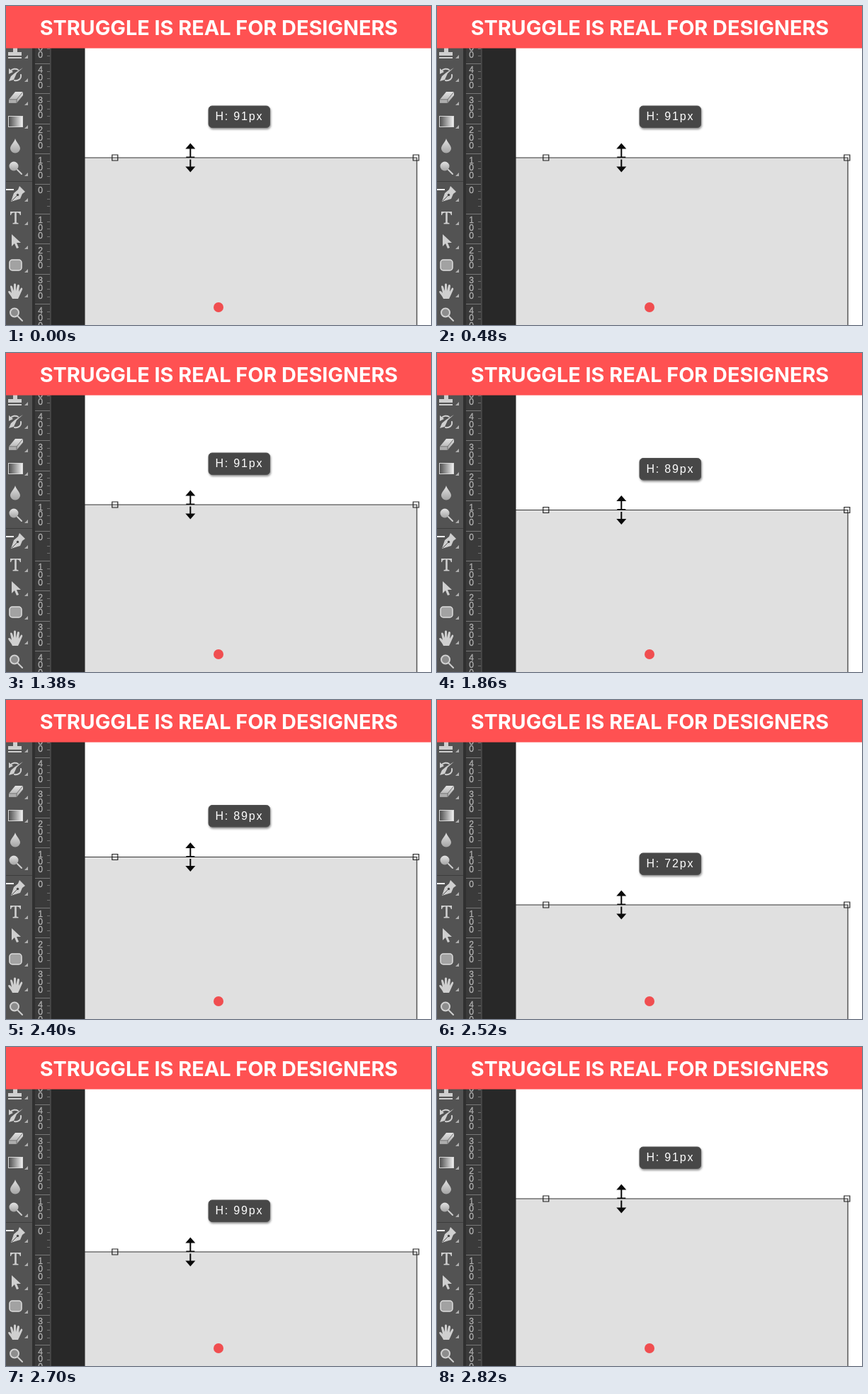
An HTML page that plays this animation: 600x450 px, repeating every 3.3 s.

```html
<!DOCTYPE html>
<html lang="en">
<head>
<meta charset="utf-8">
<title>Struggle is real for designers</title>
<style>
  html, body { margin: 0; width: 100%; height: 100%; overflow: hidden; background: #fff; }
  svg { display: block; }
  .title { font: 700 28.8px Inter, sans-serif; fill: #fff; text-anchor: middle; }
  .ruler text { font: 12px "Liberation Sans", Arial, sans-serif; fill: #b0b0b0; stroke: #b0b0b0; stroke-width: .3; text-anchor: middle; }
  .tip { filter: drop-shadow(1px 2px 1.5px rgba(0, 0, 0, .45)); }
  .tip text { font: 16px "Liberation Sans", Arial, sans-serif; letter-spacing: 1.8px; fill: #fff; }
  .tools { fill: #cfcfcf; stroke: none; }
  .line { fill: none; stroke: #cfcfcf; stroke-width: 2; stroke-linecap: round; }
</style>
</head>
<body>
<svg width="600" height="450" viewBox="0 0 600 450">
  <defs>
    <linearGradient id="fade"><stop stop-color="#4a4a4a"/><stop offset="1" stop-color="#f4f4f4"/></linearGradient>
    <linearGradient id="shine" x2="0" y2="1"><stop stop-color="#e4e4e4"/><stop offset="1" stop-color="#a4a4a4"/></linearGradient>
  </defs>

  <path id="box" d="M100 214H580V560H100z" fill="#e0e0e0" stroke="#333" stroke-width="1.200"/>
  <circle cx="300" cy="425" r="7" fill="#f04e50"/>

  <g id="drag">
    <path d="M149.800 210h8v8h-8zM574.800 210h8v8h-8z" fill="none" stroke="#222" stroke-width="1.200"/>
    <path d="M260.300 193.500l7 8h-6v11h5v1.500h-12v-1.500h5v-11h-6zM260.300 234.500l7-8h-6v-10h-2v10h-6z" fill="#0a0a0a"/>
    <g class="tip">
      <rect x="286" y="141" width="86.500" height="30.500" rx="5" fill="#474747" stroke="#505050"/>
      <text id="label" x="295.500" y="161">H: 91px</text>
    </g>
  </g>

  <rect y="59" width="111.500" height="391" fill="#282828"/>
  <rect y="59" width="38" height="391" fill="#535353"/>
  <rect x="37" y="59" width="4" height="391" fill="#303030"/>
  <rect x="41" y="59" width="22" height="391" fill="#3a3a3a"/>
  <path d="M63 59V450" stroke="#585858"/>
  <path d="M0 247.500H37" stroke="#3d3d3d"/>
  <g class="ruler" id="ruler"></g>

  <g class="tools">
    <path d="M10 59h6v6h6v5H3v-5h7zM3 72h19v2H3z"/>
    <path d="M24 87l-9 8-4 9-7 2 3-7 6-5z"/>
    <path class="line" d="M6 92c3-4 8-4 11-2M21 97c1 6-4 9-9 8"/>
    <path d="M4 88v8l6-3z"/>
    <path d="M13 121h11v5l-9 11H4v-5z" fill="url(#shine)"/>
    <path d="M4 132h11l9-11M15 132v5" fill="none" stroke="#707070"/>
    <rect x="3.500" y="155.500" width="20" height="15" fill="url(#fade)" stroke="#d8d8d8"/>
    <path d="M13 187c1 5 7 9 7 14a7 6.500 0 0 1-14 0c0-5 6-9 7-14z" fill="url(#shine)"/>
    <circle cx="11" cy="226" r="6.500" fill="url(#shine)"/>
    <path class="line" d="M16 231l6 6" stroke-width="3"/>
    <path d="M0 258h11v2H0z" fill="#eee"/>
    <path d="M19 254l8 8-4 3-3 7-13 4 4-12 6-5z"/>
    <path d="M8 275l8-8" stroke="#535353"/>
    <circle cx="16.500" cy="266.500" r="1.700" fill="#484848"/>
    <path d="M6 290h15v5h-1.200c-.4-2.500-1.500-3.400-5-3.400v14l2.700.7v1.200h-8v-1.200l2.700-.7v-14c-3.500 0-4.600.9-5 3.400H6z"/>
    <path d="M8 322v17l4-4 3 7 3-1-3-7h6z"/>
    <rect x="5" y="358" width="17" height="15" rx="4" fill="#a2a2a2" stroke="#dedede" stroke-width="1.500"/>
    <path d="M9 413c-2-5-5-7-6-10 1-2 3-1 5 2l-2-9c0-2 2-2 3 0l2 6V393c0-2 3-2 3 0v9l2-8c1-2 3-1 3 1l-1 8 3-5c1-1 3 0 2 2l-4 9-2 4z"/>
    <circle cx="12" cy="432.500" r="6" fill="#8d8d8d" stroke="#d2d2d2" stroke-width="2"/>
    <path class="line" d="M17 438l6 6" stroke-width="3.500"/>
    <g id="corners" fill="#b0b0b0"></g>
  </g>

  <rect width="600" height="59.600" fill="#ff5152"/>
  <text class="title" x="300.500" y="41">STRUGGLE IS REAL FOR DESIGNERS</text>
</svg>
<script>
const $ = id => document.getElementById(id);
const LOOP = 3300, SLOW = 30, FAST = 1830, WILD = 2370, STEP = 30;
const REST = [0, 91], NUDGE = [7.5, 89];
const HIGH = -82, LOW = 75;
const wildHeights = [98, 89, 84, 77, 95, 72, 93, 68, 88, 75, 94, 99, 86, 70, 97];

function buildRuler() {
  const gap = 42.4, zero = 250.5;
  let out = '';
  for (let n = -5; n < 5; n++) {
    const top = zero + n * gap;
    out += `<path d="M41 ${Math.round(top) + .5}H62" stroke="#777"/>`;
    for (let i = 1; i < 4; i++)
      out += `<path d="M58 ${Math.round(top + i * gap / 4) + .5}h4" stroke="#707070"/>`;
    [...String(Math.abs(n) * 100)].forEach((digit, i) => {
      out += `<text x="48.5" y="${top + 13.5 + i * 10.7}">${digit}</text>`;
    });
  }
  $('ruler').innerHTML = out;
}

function buildCorners() {
  $('corners').innerHTML = [74, 107, 140, 173, 240, 276, 309, 343, 376, 411]
    .map(y => `<path d="M31 ${y - 5}v5h-5z"/>`).join('');
}

// Returns the vertical offset and the height shown in the label.
function pose(t) {
  if (t < SLOW) return REST;
  if (t < FAST) return Math.floor((t - SLOW) / 450) % 2 ? REST : NUDGE;
  if (t < WILD) return Math.max(1, Math.floor((t - FAST) / STEP)) % 2 ? NUDGE : REST;
  const k = Math.floor((t - WILD) / STEP);
  if (k >= wildHeights.length) return REST;
  if (k === 1) return NUDGE;
  return [k % 2 ? LOW : HIGH, wildHeights[k]];
}

function draw() {
  const [dy, height] = pose(performance.now() % LOOP);
  const move = `translate(0 ${dy})`;
  $('box').setAttribute('transform', move);
  $('drag').setAttribute('transform', move);
  $('label').textContent = `H: ${height}px`;
  requestAnimationFrame(draw);
}

buildRuler();
buildCorners();
draw();
</script>
</body>
</html>
```
